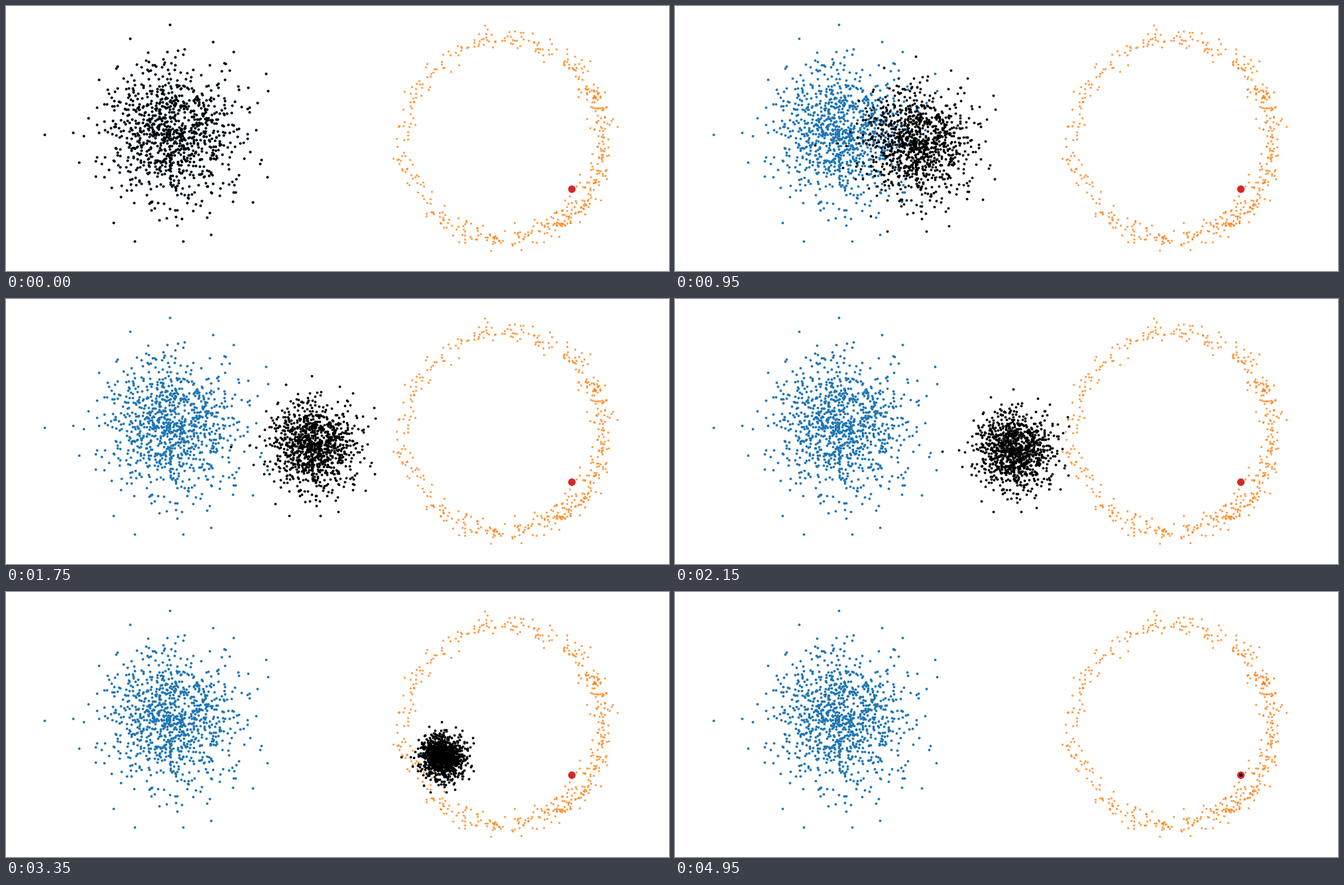
Recreate the animation shown at these times as a matplotlib script. Size 1000x400 px, loop 5000 ms.

```python
import numpy as np
import matplotlib.pyplot as plt
from matplotlib.animation import FuncAnimation

WIDTH, HEIGHT, DPI = 1000, 400, 100
FRAMES, INTERVAL = 100, 50
CLOUD_SIZE, CLOUD_CENTER, CLOUD_SIGMA = 1000, (250, 196), 50
RING_SIZE, RING_CENTER, RING_RADIUS, RING_SIGMA = 500, (750, 200), 150, 9
MAX_SPREAD = 2.8  # in sigmas
GOAL = np.array([853, 276])

rng = np.random.default_rng(7)

# Outermost samples that shape the cloud's outline
OUTLIERS = np.array([(247, 28), (187, 49), (312, 54), (343, 69), (392, 102),
                     (395, 128), (58, 194), (101, 191), (110, 236),
                     (394, 258), (372, 296), (309, 345), (194, 355),
                     (267, 355), (162, 327)])


def make_cloud():
    offsets = rng.normal(size=(2 * CLOUD_SIZE, 2))
    core = offsets[np.hypot(*offsets.T) < MAX_SPREAD]
    core = core[:CLOUD_SIZE - len(OUTLIERS)]
    return np.vstack([CLOUD_CENTER + CLOUD_SIGMA * core, OUTLIERS])


def make_ring():
    # Sparser towards the upper left
    angles = rng.uniform(0, 2 * np.pi, 4 * RING_SIZE)
    density = 0.7 - 0.3 * np.cos(angles - np.radians(145))
    angles = angles[rng.random(len(angles)) < density][:RING_SIZE]
    noise = np.clip(rng.normal(size=len(angles)), -MAX_SPREAD, MAX_SPREAD)
    radii = RING_RADIUS + RING_SIGMA * noise
    directions = np.column_stack([np.cos(angles), -np.sin(angles)])
    return RING_CENTER + radii[:, None] * directions


cloud, ring = make_cloud(), make_ring()

fig = plt.figure(figsize=(WIDTH / DPI, HEIGHT / DPI), dpi=DPI, facecolor="white")
ax = fig.add_axes([0, 0, 1, 1])
ax.set_xlim(0, WIDTH)
ax.set_ylim(HEIGHT, 0)
ax.axis("off")

ax.scatter(*cloud.T, s=3, color="tab:blue", zorder=1)
ax.scatter(*ring.T, s=2, color="tab:orange", alpha=0.6, zorder=2)
ax.scatter(*GOAL, s=50, color="tab:red", zorder=3)
particles = ax.scatter(*cloud.T, s=3, color="black", zorder=4)


def update(frame):
    t = frame / (FRAMES - 1)
    particles.set_offsets((1 - t) * cloud + t * GOAL)
    return (particles,)


anim = FuncAnimation(fig, update, frames=FRAMES, interval=INTERVAL,
                     repeat=True, repeat_delay=0)
plt.show()
```
